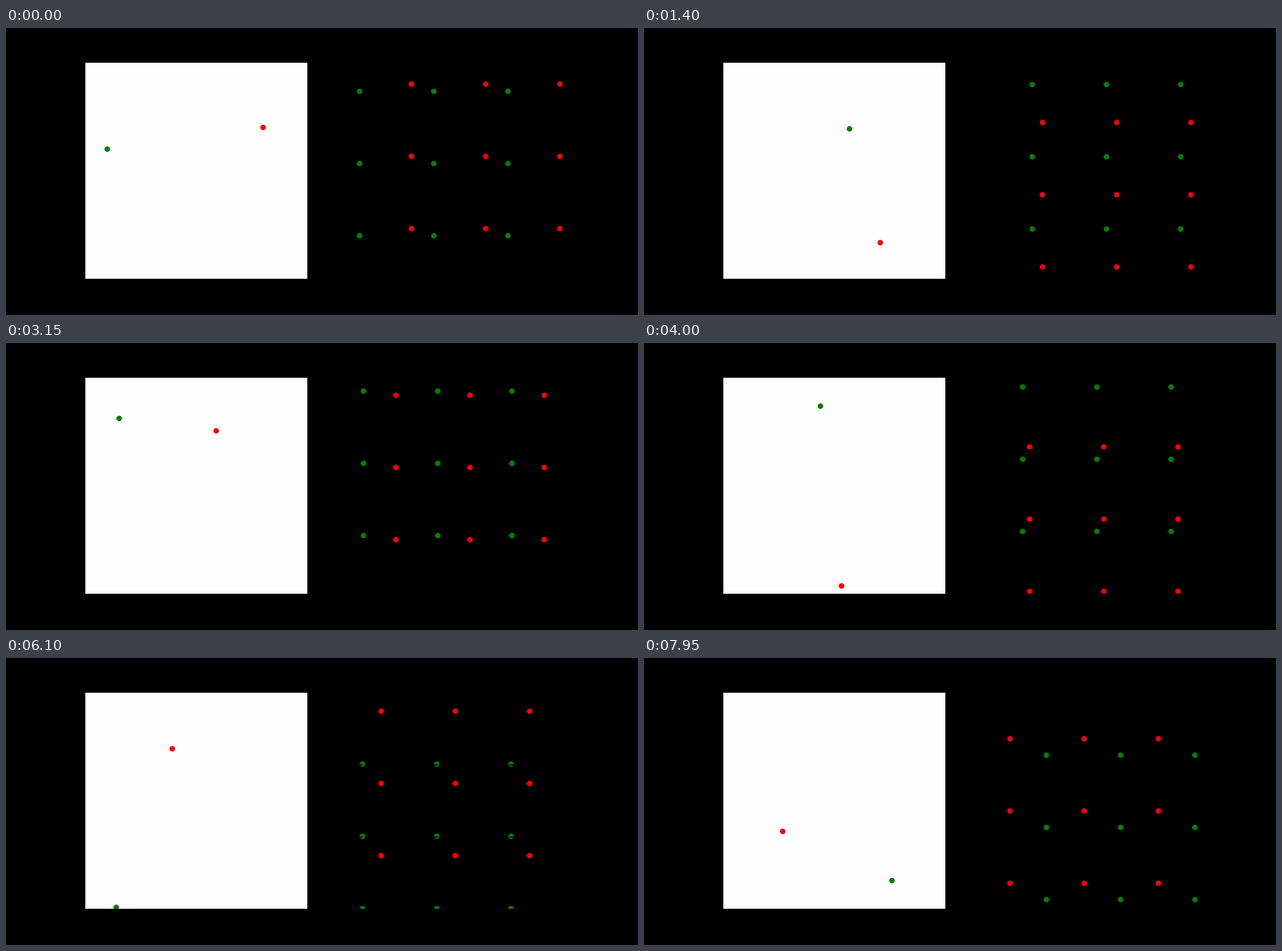
A matplotlib script that plays this animation: 1110x505 px, repeating every 8000 ms.

```python
import numpy as np
import matplotlib.pyplot as plt
from matplotlib.animation import FuncAnimation

FRAMES = 160
STEP = 5 / 299          # linspace(0, 5, 300) spacing
TILES = 3
DOT = 7                 # diameter in points

# colour, start point, direction on the unit torus
WALKERS = [
    ("green", (0.1, 0.6), (1.0, 0.2)),
    ("red", (0.8, 0.7), (-0.2, 1.0)),
]

fig, (single, tiled) = plt.subplots(1, 2, figsize=(11.1, 5.05), dpi=100)
fig.subplots_adjust(left=0.125, right=0.9, bottom=0.125, top=0.88, wspace=0.2)
fig.set_facecolor("black")


def style(ax, size, color):
    ax.set(xlim=(0, size), ylim=(0, size), xticks=[], yticks=[], facecolor=color)
    for spine in ax.spines.values():
        spine.set(color="black", linewidth=0.8, snap=False)


style(single, 1, "#fdfdfd")
style(tiled, TILES, "black")


def dots(ax, color):
    # no edge, so that dots keep their sub-pixel positions
    return ax.scatter([], [], s=DOT**2, c=color, edgecolors="none")


pairs = [(dots(single, c), dots(tiled, c)) for c, _, _ in WALKERS]

# dashed tile borders lie over the dots
for k in range(1, TILES):
    tiled.plot([0, TILES], [k, k], "k--", lw=1.5, zorder=3)
    tiled.plot([k, k], [0, TILES], "k--", lw=1.5, zorder=3)

shifts = np.array([(i, j) for i in range(TILES) for j in range(TILES)])


def update(i):
    for (one, many), (_, start, direction) in zip(pairs, WALKERS):
        pos = (np.array(start) + i * STEP * np.array(direction)) % 1
        one.set_offsets([pos])
        many.set_offsets(pos + shifts)
    return [artist for pair in pairs for artist in pair]


anim = FuncAnimation(fig, update, frames=FRAMES, interval=50, repeat=True, repeat_delay=0)
plt.show()
```
